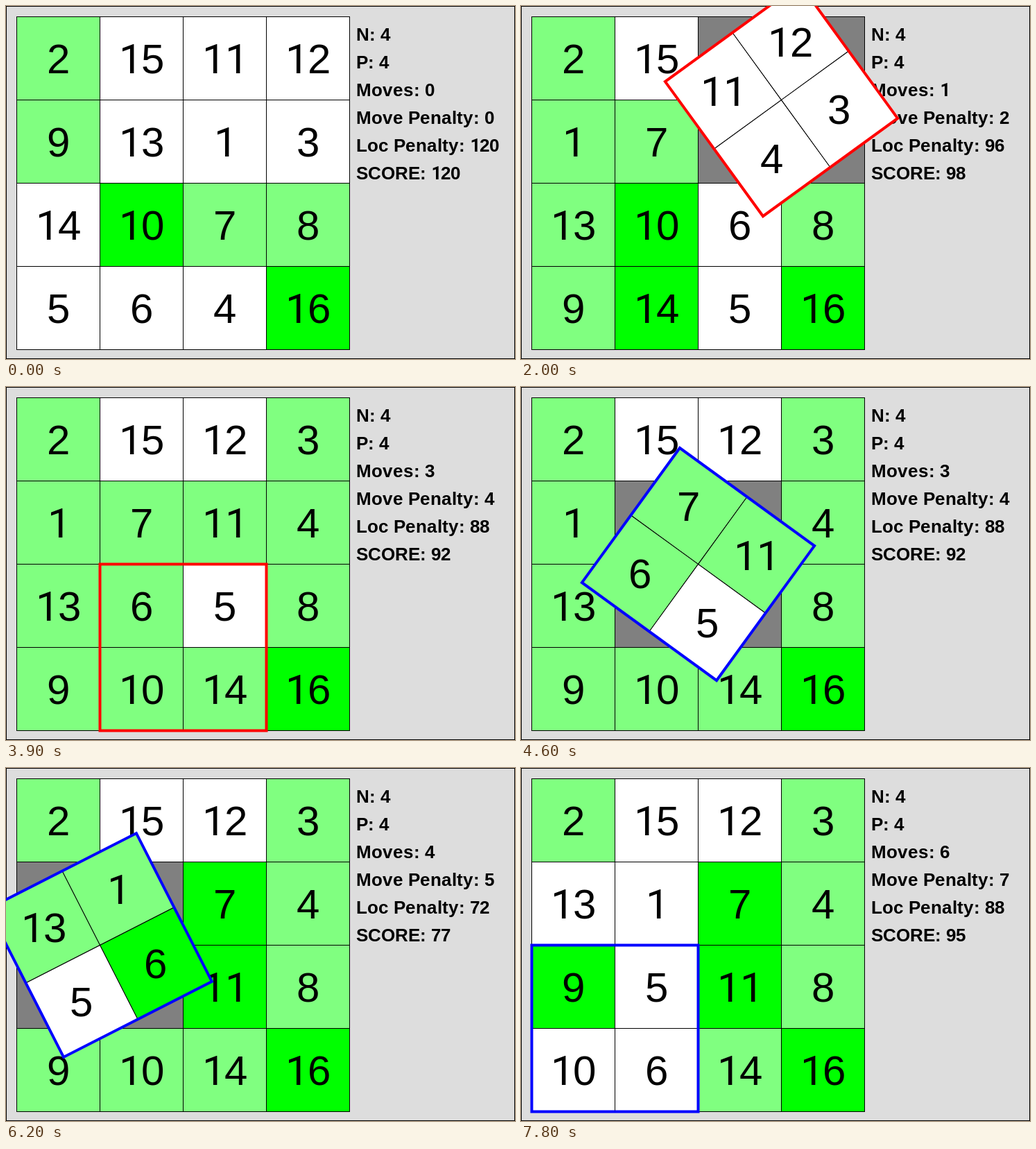
Animation of 734 by 509 pixels, one loop 8000 ms. Source, as an HTML page with a canvas:

```html
<!DOCTYPE html>
<html lang="en">
<head>
<meta charset="utf-8">
<title>Rotating number puzzle</title>
<style>
html, body { margin: 0; width: 100%; height: 100%; overflow: hidden; background: #ddd; }
canvas { display: block; }
</style>
</head>
<body>
<canvas id="board" width="734" height="509"></canvas>
<script>
const ctx = document.getElementById('board').getContext('2d');
const N = 4, P = 4, CELL = 120, EDGE = 15.5;
const LOOP = 8000, LEAD = 300, TURN = 1300, TICK = 100, TICKS = 10;

const START = [
  [2, 15, 11, 12],
  [9, 13, 1, 3],
  [14, 10, 7, 8],
  [5, 6, 4, 16]
];
// dir: -1 turns counter-clockwise, 1 clockwise
const MOVES = [
  { row: 1, col: 0, size: 3, dir: -1 },
  { row: 0, col: 2, size: 2, dir: -1 },
  { row: 2, col: 1, size: 2, dir: -1 },
  { row: 1, col: 1, size: 2, dir: 1 },
  { row: 1, col: 0, size: 2, dir: 1 },
  { row: 2, col: 0, size: 2, dir: 1 }
];

const distance = (v, r, c) =>
  Math.abs(Math.floor((v - 1) / N) - r) + Math.abs((v - 1) % N - c);

function turn(grid, { row, col, size, dir }) {
  const next = grid.map(line => line.slice());
  for (let i = 0; i < size; i++)
    for (let j = 0; j < size; j++)
      next[row + i][col + j] = dir < 0
        ? grid[row + j][col + size - 1 - i]
        : grid[row + size - 1 - j][col + i];
  return next;
}

const states = [{ grid: START, cost: 0 }];
for (const m of MOVES) {
  const last = states[states.length - 1];
  states.push({ grid: turn(last.grid, m), cost: last.cost + m.size - 1 });
}

const isDigit = ch => ch >= '0' && ch <= '9';

// Text on whole-pixel advances; the plain "1" without a foot comes from Roboto.
function write(text, x, y, size, weight = '') {
  const base = `${weight} ${size}px "Liberation Sans", Arial, sans-serif`;
  const one = `${weight} ${size}px Roboto, sans-serif`;
  ctx.fillStyle = '#000';
  for (const ch of text) {
    ctx.font = base;
    const w = ctx.measureText(ch).width;
    if (ch === '1') ctx.font = one;
    ctx.fillText(ch, ch === '1' ? x + size * 0.016 : x, y);
    x += isDigit(ch) ? Math.floor(w) : Math.round(w + 0.1);
  }
}

function square(x, y, fill) {
  ctx.fillStyle = fill;
  ctx.fillRect(x, y, CELL, CELL);
  ctx.strokeStyle = '#000';
  ctx.lineWidth = 1;
  ctx.strokeRect(x, y, CELL, CELL);
}

function number(v, cx, cy) {
  const s = String(v);
  write(s, Math.floor(cx - s.length * 16.5), cy + 21.5, 60);
}

function tileColour(v, r, c) {
  return ['#00ff00', '#80ff80'][distance(v, r, c)] || '#fff';
}

function drawBlock(grid, { row, col, size, dir }, angle) {
  const half = size * CELL / 2;
  const cx = EDGE + col * CELL + half, cy = EDGE + row * CELL + half;
  const cos = Math.cos(angle), sin = Math.sin(angle);
  const each = fn => {
    for (let i = 0; i < size; i++)
      for (let j = 0; j < size; j++)
        fn(grid[row + i][col + j], row + i, col + j, j * CELL - half, i * CELL - half);
  };
  ctx.save();
  ctx.translate(cx, cy);
  ctx.rotate(angle);
  each((v, r, c, x, y) => square(x, y, tileColour(v, r, c)));
  ctx.strokeStyle = dir < 0 ? '#f00' : '#00f';
  ctx.lineWidth = 4;
  ctx.strokeRect(-half, -half, half * 2, half * 2);
  ctx.restore();
  // numbers stay upright
  each((v, r, c, x, y) => {
    const dx = x + CELL / 2, dy = y + CELL / 2;
    number(v, cx + dx * cos - dy * sin, cy + dx * sin + dy * cos);
  });
}

function drawPanel(grid, moves, cost) {
  let loc = 0;
  grid.forEach((line, r) => line.forEach((v, c) => { loc += P * distance(v, r, c); }));
  [
    `N: ${N}`,
    `P: ${P}`,
    `Moves: ${moves}`,
    `Move Penalty: ${cost}`,
    `Loc Penalty: ${loc}`,
    `SCORE: ${cost + loc}`
  ].forEach((s, i) => write(s, 505, 50 + 40 * i, 26, 'bold'));
}

function draw(t) {
  const index = Math.floor((t - LEAD) / TURN);
  const move = MOVES[index];
  const tick = move ? Math.min(TICKS, Math.floor((t - LEAD - index * TURN) / TICK)) : 0;
  const done = tick === TICKS;
  const count = move ? index + (done ? 1 : 0) : 0;
  const { grid, cost } = states[count];

  ctx.fillStyle = '#ddd';
  ctx.fillRect(0, 0, 734, 509);
  ctx.strokeStyle = '#000';
  ctx.lineWidth = 1;
  ctx.strokeRect(0.5, 0.5, 733, 508);

  const lifted = (r, c) => move &&
    r >= move.row && r < move.row + move.size &&
    c >= move.col && c < move.col + move.size;
  grid.forEach((line, r) => line.forEach((v, c) => {
    const x = EDGE + c * CELL, y = EDGE + r * CELL;
    square(x, y, lifted(r, c) ? '#808080' : tileColour(v, r, c));
    if (!lifted(r, c)) number(v, x + CELL / 2, y + CELL / 2);
  }));

  drawPanel(grid, count, cost);
  if (move) drawBlock(grid, move, done ? 0 : move.dir * tick / TICKS * Math.PI / 2);
}

function loop() {
  draw(performance.now() % LOOP);
  requestAnimationFrame(loop);
}
loop();
</script>
</body>
</html>
```
